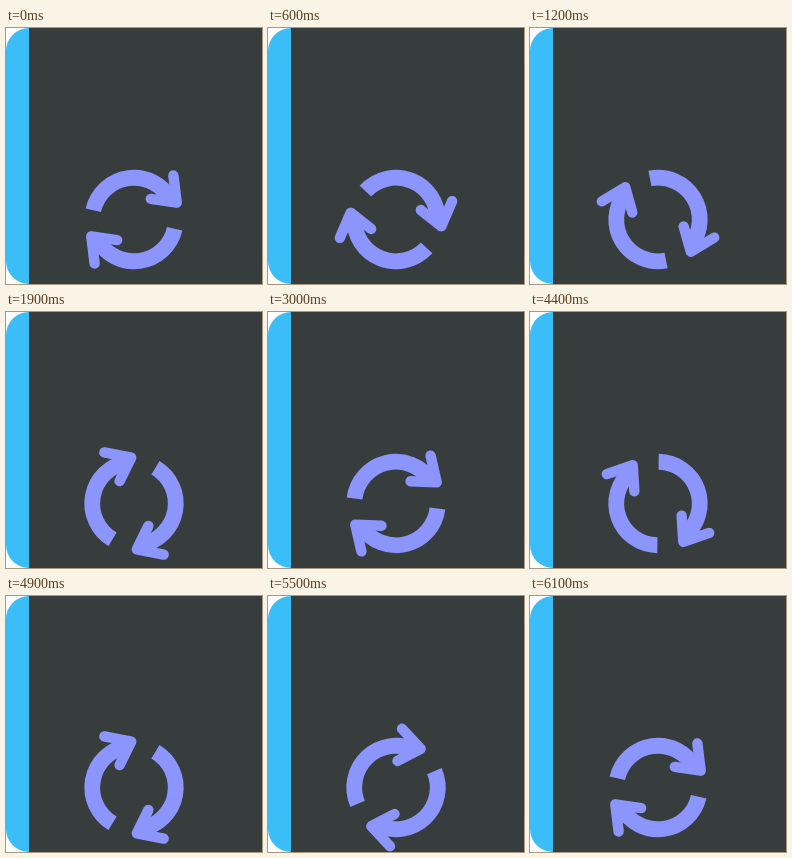
Recreate the animation shown at these times as an HTML page. Size 256 by 256 pixels, loop 6.2 s.

```html
<!DOCTYPE html>
<html lang="en">
<head>
<meta charset="utf-8">
<title>Refresh spinner</title>
<style>
  html, body { margin: 0; width: 100%; height: 100%; overflow: hidden; background: #fff; }
  svg { display: block; width: 100vw; height: 100vh; }
  .icon { fill: none; stroke: #8b95fb; }
  .arc { stroke-width: 15.8; }
  .head { stroke-width: 10.4; stroke-linecap: round; stroke-linejoin: round; }
</style>
</head>
<body>
<svg viewBox="0 0 256 256">
  <path fill="#373d3d" d="M22 0H256V256H22Z"/>
  <path fill="#3bbdf7" d="M23 0V256A23 23 0 0 1 0 233V23A23 23 0 0 1 23 0Z"/>
  <g id="spinner" class="icon">
    <g id="arrow">
      <path class="arc" d="M-40.7 -9.3A41.7 41.7 0 0 1 36.8 -19.6"/>
      <path class="head" d="M39.4 -44L42.7 -16.8L16.8 -20.6"/>
    </g>
    <use href="#arrow" transform="rotate(180)"/>
  </g>
</svg>
<script>
  const LOOP = 6200, STEP = 100, DEGREES = 6;
  const spinner = document.getElementById('spinner');
  const start = performance.now();

  function draw() {
    const time = (performance.now() - start) % LOOP;
    // The first pose is held for two steps.
    const step = Math.max(0, Math.floor(time / STEP) - 1);
    spinner.setAttribute('transform', `translate(128 191.5) rotate(${step * DEGREES})`);
    requestAnimationFrame(draw);
  }
  draw();
</script>
</body>
</html>
```
